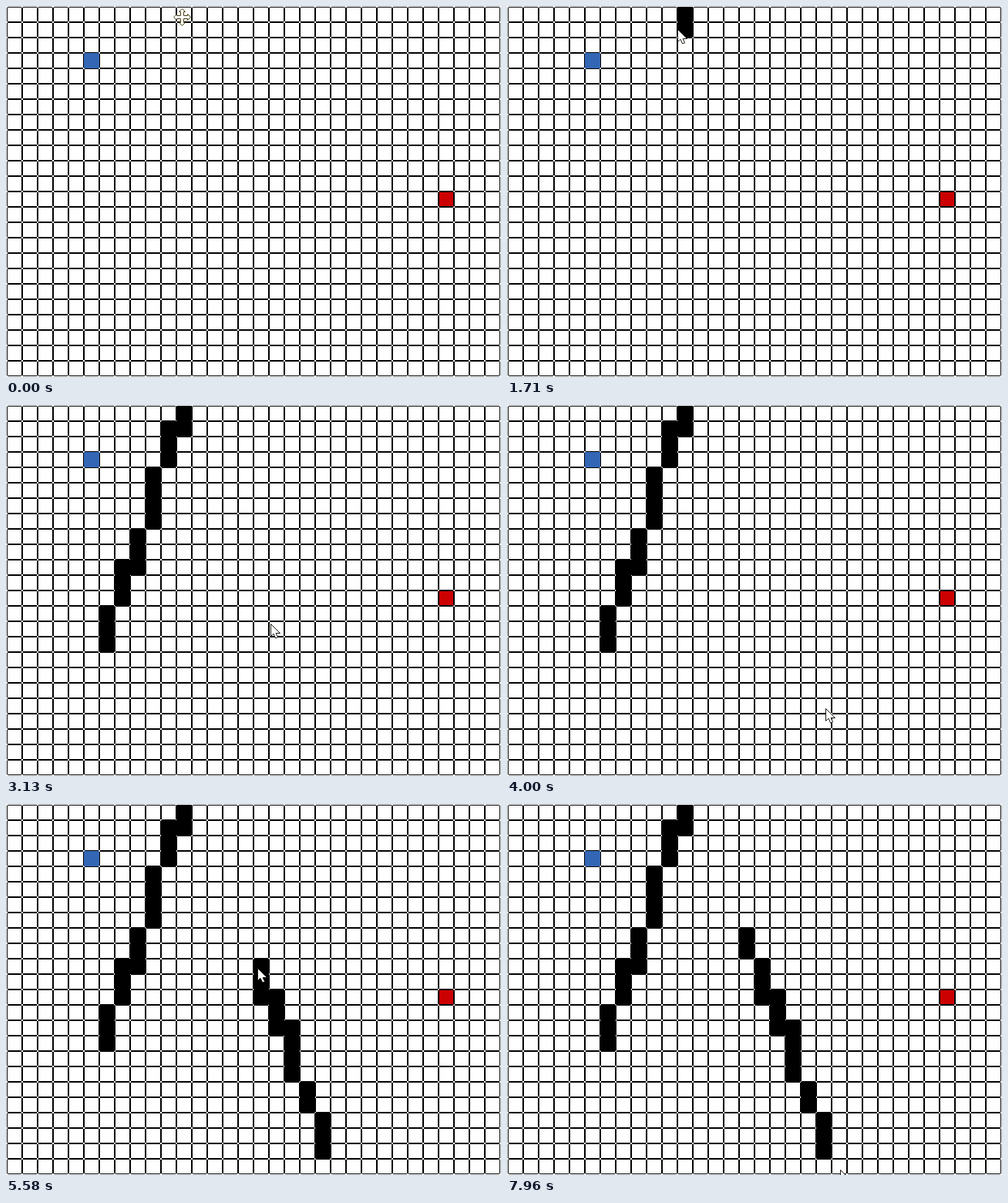
Animation, 642 px wide and 482 px high, one loop 8000 ms. Source, as an HTML page:

```html
<!DOCTYPE html>
<html lang="en">
<head>
<meta charset="utf-8">
<title>Drawing walls on a grid</title>
<style>
  html, body { margin: 0; width: 100%; height: 100%; overflow: hidden; background: #fff; }
  svg { display: block; }
  #arrow, #mover { fill: #fff; stroke: #1c1a12; }
  #mover { stroke: #4a3f14; }
</style>
</head>
<body>
<svg width="642" height="482" viewBox="0 0 642 482">
  <defs>
    <pattern id="cell" x="1" y="1" width="20" height="20" patternUnits="userSpaceOnUse">
      <path d="M1 .5H19M1 19.5H19M.5 1V19M19.5 1V19" stroke="#000" shape-rendering="crispEdges"/>
    </pattern>
  </defs>
  <rect x="561" y="241" width="20" height="20" fill="#cc0000"/>
  <rect x="1" y="1" width="640" height="480" fill="url(#cell)"/>
  <rect x="101" y="61" width="20" height="20" fill="#3366b4"/>
  <g id="walls" shape-rendering="crispEdges"></g>
  <path id="mover" transform="translate(228.5 14.5)"
        d="M0-11L4-7H2V-2H7V-4L11 0L7 4V2H2V7H4L0 11L-4 7H-2V2H-7V4L-11 0L-7-4V-2H-2V-7H-4Z"/>
  <path id="arrow" d="M.5.5V16.5L4 13.2L6.6 19L9.6 17.8L7.1 12.5H12.5Z"/>
</svg>
<script>
const LOOP = 8000, CELL = 20, SWAP = 210;

// each wall is drawn at a steady vertical pace (ms per pixel) through a few points
const down = { start: 1610, pace: 4.1, points: [[230, 5], [202, 80], [182, 161], [123, 305]] };
const up = {
  start: 4660, pace: 3.8,
  points: [[411, 455], [402, 404], [380, 358], [362, 293], [340, 250], [309, 165]]
};

const walls = document.getElementById('walls');
const arrow = document.getElementById('arrow');
const mover = document.getElementById('mover');

const mix = (a, b, k) => a + (b - a) * k;
const timeAt = (wall, y) => wall.start + Math.abs(y - wall.points[0][1]) * wall.pace;
const timed = wall => wall.points.map(([x, y]) => [timeAt(wall, y), x, y]);

// pointer tip: time, x, y
const path = [
  [0, 229, 14], [1130, 229, 14],
  ...timed(down),
  [3130, 343, 284], [3420, 408, 262], [4300, 416, 462],
  ...timed(up),
  [6130, 418, 456], [6330, 432, 472], [LOOP, 432, 475]
];

function pointer(t) {
  const i = path.findIndex(p => p[0] > t);
  const [t0, x0, y0] = path[i - 1], [t1, x1, y1] = path[i];
  const k = (t - t0) / (t1 - t0);
  return [mix(x0, x1, k), mix(y0, y1, k)];
}

// fill the cell under the tip at every half cell of height
function wallCells(wall) {
  const height = Math.abs(wall.points.at(-1)[1] - wall.points[0][1]);
  const cells = [];
  for (let d = 0; d <= height; d += CELL / 2) {
    const at = wall.start + d * wall.pace;
    const [left, top] = pointer(at).map(v => Math.floor((v - 1) / CELL) * CELL + 1);
    const el = document.createElementNS('http://www.w3.org/2000/svg', 'path');
    el.setAttribute('d', `M${left} ${top}h${CELL}v${CELL}h${-CELL}z`);
    walls.append(el);
    cells.push({ el, at });
  }
  return cells;
}

const cells = [down, up].flatMap(wallCells);

function show(el, on) {
  el.style.display = on ? '' : 'none';
}

function draw(now) {
  const t = Math.max(0, now) % LOOP;
  const [x, y] = pointer(t).map(Math.round);
  for (const c of cells) show(c.el, t >= c.at);
  show(mover, t < SWAP);
  show(arrow, t >= SWAP);
  arrow.setAttribute('transform', `translate(${x} ${y})`);
  requestAnimationFrame(draw);
}

draw(performance.now());
</script>
</body>
</html>
```
